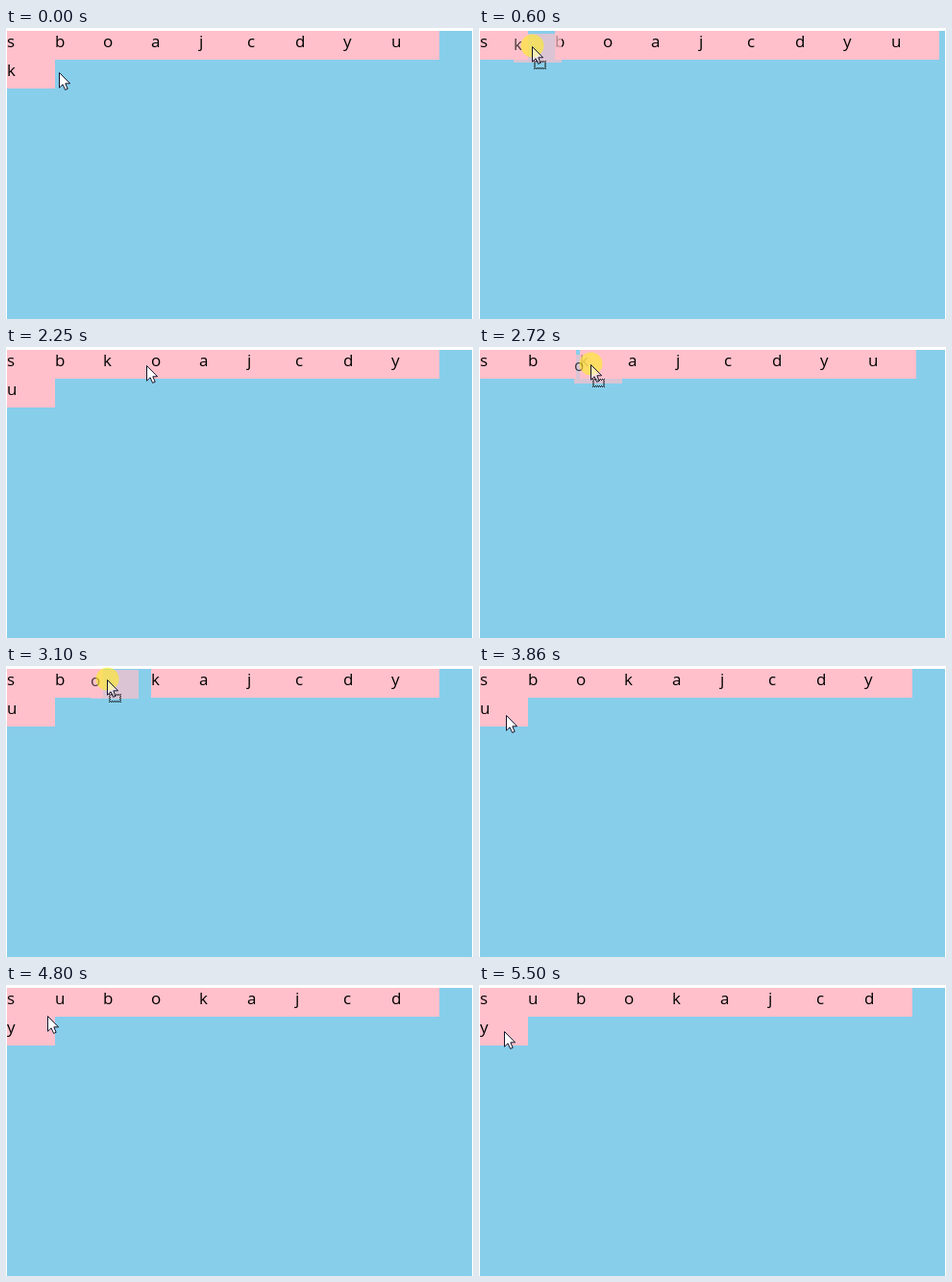
An HTML page that plays this animation: 486 px wide and 303 px high, repeating every 5.57 s.

```html
<!DOCTYPE html>
<html lang="en">
<head>
<meta charset="utf-8">
<title>Drag to sort</title>
<style>
  html, body { margin: 0; width: 100%; height: 100%; overflow: hidden; background: #fff; }
  svg { display: block; width: 486px; height: 303px; }
  text { font: 17px "Open Sans", "Noto Sans", sans-serif; fill: #000; }
</style>
</head>
<body>
<svg viewBox="0 0 486 303">
  <rect x="1" y="3" width="484" height="300" fill="#87ceeb"/>
  <g id="cells"></g>
  <circle id="press" cx=".5" cy="-.5" r="12" fill="#ffee1e" fill-opacity=".6"/>
  <g id="cursor">
    <g id="badge" fill="none" stroke="#111" stroke-dasharray="1" stroke-dashoffset=".5" shape-rendering="crispEdges">
      <rect x="2.5" y="15.5" width="12" height="8"/>
      <rect x="3.5" y="16.5" width="10" height="6"/>
    </g>
    <path id="arrow" d="M.5 .5V16.2L4.1 12.8L6.6 18.4L9.2 17.3L6.8 11.8H11.6Z" fill="#fff" stroke="#14142a"/>
  </g>
</svg>
<script>
const LOOP = 5570, STEP = 75, LEFT = 1, TOP = 3, RIGHT = 485, W = 50, H = 30;
const START = [..."sboajcdyuk"];
const $ = id => document.getElementById(id);

// from: where the cell is picked up, to: where the pointer carries it,
// dx, dy: pointer position inside the cell, slot: where the gap opens
const drags = [
  { key: "k", slot: 1, press: 300, open: 468, drop: 840, from: [20, 46], to: [55, 19], dx: 19, dy: 13 },
  { key: "b", slot: 1, press: 1240, open: 1567, drop: 1930, from: [113, 21], to: [52, 19], dx: 12, dy: 18 },
  { key: "o", slot: 2, press: 2375, open: 2685, drop: 3180, from: [168, 14], to: [105, 14], dx: 17, dy: 10 },
  { key: "u", slot: 1, press: 3860, open: 4177, drop: 4640, from: [26, 51], to: [55, 19], dx: 25, dy: 18 }
];

// Pointer legs: each one starts where the last one ended
const legs = [];
let here = [55, 46], free = 0;
function go(start, end, to) {
  legs.push({ start, end, from: here, to });
  here = to;
}
const dist = (a, b) => Math.hypot(b[0] - a[0], b[1] - a[1]);
for (const d of drags) {
  go(Math.max(free, d.press - 4.5 * dist(here, d.from)), d.press, d.from);
  go(d.press, d.open + 130, d.to);
  free = d.drop;
}
go(free, 5090, [13, 47]);
go(5250, 5475, [26, 48]);

const clamp = k => Math.min(1, Math.max(0, k));
const smooth = k => k * k * (3 - 2 * k);

function pointer(t) {
  const { start, end, from, to } = legs.filter(l => l.start <= t).pop() || legs[0];
  const k = smooth(clamp((t - start) / (end - start)));
  const sag = Math.min(7, dist(from, to) / 8) * Math.sin(Math.PI * k);
  return [from[0] + (to[0] - from[0]) * k, from[1] + (to[1] - from[1]) * k + sag];
}

const gapWidth = age => W * (1 - (1 - clamp(age / 393)) ** 2);

const cells = {};
for (const key of START) {
  const g = document.createElementNS("http://www.w3.org/2000/svg", "g");
  g.innerHTML = `<rect width="${W}" height="${H}" fill="#ffc0cb"/><text y="17">${key}</text>`;
  $("cells").append(g);
  cells[key] = g;
}

const move = (el, x, y) => el.setAttribute("transform", `translate(${Math.round(x)} ${Math.round(y)})`);
const show = (el, on) => el.setAttribute("visibility", on ? "visible" : "hidden");

function layout(order, slot, gap) {
  let x = LEFT, y = TOP;
  order.forEach((key, i) => {
    if (i === slot) x += gap;
    if (x + W > RIGHT) { x = LEFT; y += H; }
    move(cells[key], x, y);
    x += W;
  });
}

function draw(t) {
  const [x, y] = pointer(t);
  let order = START, held = null;
  for (const d of drags) {
    if (t < d.press + STEP) break;
    order = order.filter(key => key !== d.key);
    if (t < d.drop) held = d;
    else order.splice(d.slot, 0, d.key);
  }
  layout(order, held ? held.slot : -1, held ? gapWidth(t - held.open) : 0);
  for (const key of START) cells[key].setAttribute("opacity", held && held.key === key ? .7 : 1);
  if (held) {
    const ghost = cells[held.key];
    $("cells").append(ghost);
    move(ghost, x - held.dx, y - held.dy);
  }
  move($("press"), x, y);
  show($("press"), drags.some(d => t >= d.press && t < d.drop));
  move($("cursor"), x, y);
  show($("badge"), held);
  $("arrow").setAttribute("fill-opacity", held ? .5 : 1);
}

let last = -1;
function frame(now) {
  const tick = Math.floor(now % LOOP / STEP) * STEP;
  if (tick !== last) draw(last = tick);
  requestAnimationFrame(frame);
}
draw(0);
requestAnimationFrame(frame);
</script>
</body>
</html>
```
